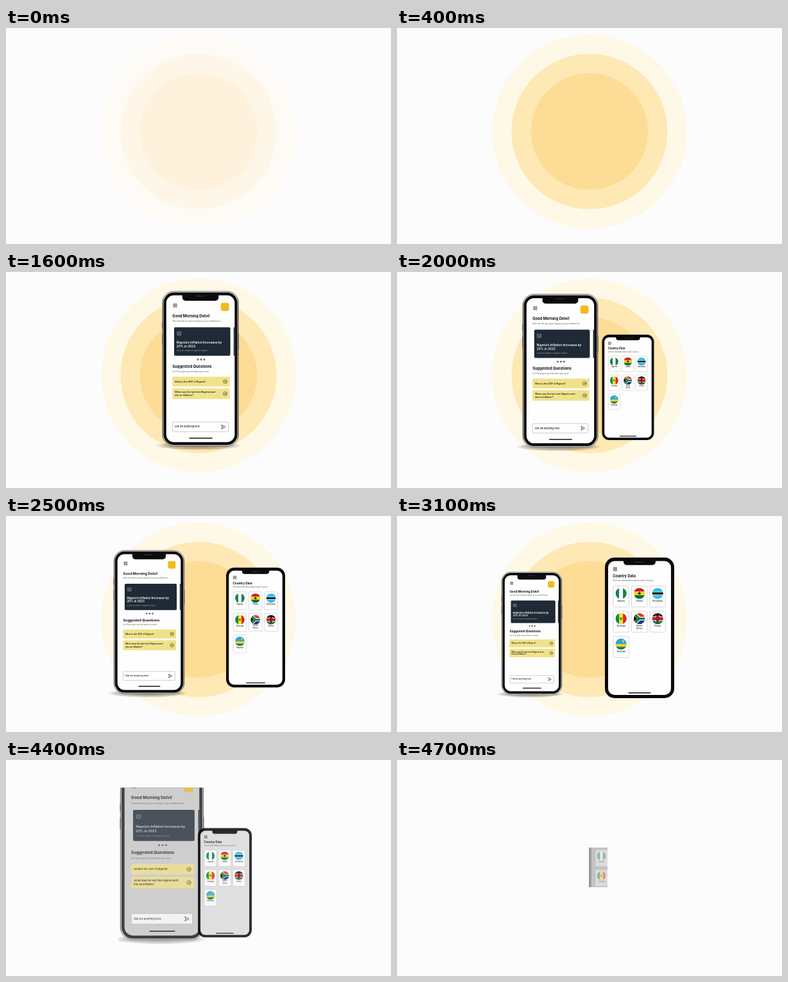
Recreate the animation shown at these times as an HTML page with a canvas. Size 600 by 338 pixels, loop 4.8 s.

```html
<!DOCTYPE html>
<html lang="en">
<head>
<meta charset="utf-8">
<title>Phones</title>
<style>
html, body { margin: 0; width: 100%; height: 100%; overflow: hidden; background: #fdfcfd; }
canvas { display: block; width: 600px; height: 338px; }
</style>
</head>
<body>
<canvas id="stage"></canvas>
<script>
const W = 600, H = 338, LOOP = 4800, STEP = 100;
const cv = document.getElementById('stage');
const c = cv.getContext('2d');
const dpr = window.devicePixelRatio || 1;
cv.width = W * dpr;
cv.height = H * dpr;

const clamp = (v, a = 0, b = 1) => Math.max(a, Math.min(b, v));
const ramp = (t, a, b) => clamp((t - a) / (b - a));
const easeOut = p => 1 - Math.pow(1 - p, 3);

// rows: time, centre x, centre y, width
const leftPath = [
  [1200, 305, 149.5, 120], [1700, 302, 152, 118.5], [2000, 254.5, 154.5, 117.5],
  [2300, 229, 161, 113], [2500, 223, 166, 110], [3100, 210, 183.5, 94],
  [3700, 238.5, 156, 122], [4000, 243, 149, 130]
];
const rightPath = [
  [1700, 312, 170, 70], [2000, 360, 180.5, 81], [2300, 384, 177, 90],
  [2500, 389, 174.5, 92], [2900, 400, 156, 120], [3100, 378, 175, 108],
  [3500, 346, 205, 86], [3700, 340.5, 207.5, 81], [4000, 341, 192, 84]
];

// Smooth curve through the rows that never overshoots them
function along(path, t) {
  const last = path.length - 1;
  if (t <= path[0][0]) return path[0].slice(1);
  if (t >= path[last][0]) return path[last].slice(1);
  let i = 0;
  while (path[i + 1][0] <= t) i++;
  const rise = (j, k) => (path[j + 1][k] - path[j][k]) / (path[j + 1][0] - path[j][0]);
  const slope = (j, k) => {
    if (j === 0 || j === last) return 0;
    const a = rise(j - 1, k), b = rise(j, k);
    return a * b <= 0 ? 0 : 2 * a * b / (a + b);
  };
  const d = path[i + 1][0] - path[i][0], p = (t - path[i][0]) / d, q = 1 - p;
  return [1, 2, 3].map(k =>
    q * q * (1 + 2 * p) * path[i][k] + p * p * (3 - 2 * p) * path[i + 1][k] +
    d * p * q * (q * slope(i, k) - p * slope(i + 1, k)));
}

function box(x, y, w, h, r, fill, stroke, lw = 0.5) {
  c.beginPath();
  c.roundRect(x, y, w, h, r);
  if (fill) { c.fillStyle = fill; c.fill(); }
  if (stroke) { c.strokeStyle = stroke; c.lineWidth = lw; c.stroke(); }
}

function disc(x, y, r, fill) {
  c.beginPath();
  c.arc(x, y, r, 0, 7);
  c.fillStyle = fill;
  c.fill();
}

function line(pts, color, lw) {
  c.beginPath();
  pts.forEach(([x, y]) => c.lineTo(x, y));
  c.strokeStyle = color;
  c.lineWidth = lw;
  c.stroke();
}

function poly(pts, fill) {
  c.beginPath();
  pts.forEach(([x, y]) => c.lineTo(x, y));
  c.closePath();
  c.fillStyle = fill;
  c.fill();
}

function text(s, x, y, size, weight = 400, color = '#111', align = 'left') {
  c.font = `${weight} ${size}px Inter, Roboto, sans-serif`;
  c.textAlign = align;
  c.fillStyle = color;
  c.fillText(s, x, y);
}

function menuIcon(x, y) {
  for (let i = 0; i < 4; i++)
    box(x + (i % 2) * 3.2, y + (i >> 1) * 3.2, 2.2, 2.2, 0.5, null, '#222', 0.7);
}

function notch(x, w, top, bottom) {
  box(x, top, w, bottom - top, [0, 0, 5, 5], '#0b0b0d');
  box(x + w / 2 - 8, top + 2, 13, 1.3, 0.6, '#34343a');
  disc(x + w / 2 + 9, top + 2.6, 1, '#242a3c');
}

function arrow(x, y) {
  c.beginPath();
  c.arc(x, y, 3, 0, 7);
  c.strokeStyle = '#222';
  c.lineWidth = 0.6;
  c.stroke();
  line([[x - 1.6, y], [x + 1.6, y]], '#222', 0.6);
  line([[x + 0.4, y - 1.3], [x + 1.7, y], [x + 0.4, y + 1.3]], '#222', 0.6);
}

function shadow() {
  c.save();
  c.translate(57, 244);
  c.scale(68, 7);
  const g = c.createRadialGradient(0, 0, 0.2, 0, 0, 1);
  g.addColorStop(0, 'rgba(60,50,30,.5)');
  g.addColorStop(0.75, 'rgba(60,50,30,.25)');
  g.addColorStop(1, 'rgba(60,50,30,0)');
  disc(0, 0, 1, g);
  c.restore();
}

// 120 x 245 units
function homePhone() {
  shadow();
  const metal = c.createLinearGradient(0, 0, 120, 0);
  metal.addColorStop(0, '#55565a');
  metal.addColorStop(0.02, '#d9dadd');
  metal.addColorStop(0.98, '#d9dadd');
  metal.addColorStop(1, '#55565a');
  box(-0.5, 48, 1.5, 11, 0.5, '#66676b');
  box(-0.5, 68, 1.5, 17, 0.5, '#66676b');
  box(119.2, 67, 1.3, 26, 0.5, '#66676b');
  box(0.3, 0.3, 119.4, 244.4, 17.5, metal, '#3c3d40', 0.7);
  box(2, 2, 116, 241, 16, '#0b0b0d');
  box(6.2, 6.5, 107.6, 232, 12, '#fefefe');
  notch(31.5, 57, 5, 15.2);

  menuIcon(17.4, 19.8);
  box(92, 18.3, 13, 13, 3, '#f0bb22');
  text('Good Morning Dolvi!', 15.8, 41.4, 5.9, 700);
  text('Here are the top topics based on your preferences', 15.8, 48.3, 3.2, 400, '#555');

  box(18.5, 57, 88.5, 45, 2, '#1e2a35');
  box(112.2, 57, 1.6, 45, 0.5, '#1e2a35');
  box(23.5, 64.3, 6, 5, 0.6, null, '#c5cbd0', 0.6);
  for (const y of [66, 67.8]) line([[24.6, y], [26, y]], '#c5cbd0', 0.7);
  for (const y of [66, 67.8]) line([[26.8, y], [28.5, y]], '#c5cbd0', 0.5);
  text('Nigeria\u2019s Inflation Increases by', 22.4, 83, 4.8, 600, '#fff');
  text('20% in 2023', 22.4, 89, 4.8, 600, '#fff');
  text('Get all the details on Nigeria\u2019s Inflation', 22.4, 95.4, 2.7, 400, '#a3abb2');
  for (let i = 0; i < 3; i++) disc(56 + i * 5, 108, 1.45, '#625f66');

  text('Suggested Questions', 15.8, 121, 5.9, 700);
  text('Let Tolvin give you the facts you need', 15.8, 128.2, 3.2, 400, '#555');
  box(15.8, 135, 90.4, 15.5, 1.5, '#f0e28a');
  box(15.8, 153.6, 90.4, 16.8, 1.5, '#f0e28a');
  text('What is the GDP of Nigeria?', 19.6, 144, 3.7, 500);
  text('When was the last time Nigeria went', 19.6, 160.8, 3.7, 500);
  text('into an Inflation?', 19.6, 165.6, 3.7, 500);
  arrow(98.8, 142.8);
  arrow(98.8, 162);

  box(16, 206.8, 88, 15.2, 1.2, '#fff', '#a4a4a8', 0.6);
  text('Ask me anything here', 19.6, 215.5, 3.8, 500);
  c.lineJoin = 'round';
  line([[93, 211.2], [99, 214.4], [93, 217.6], [94.2, 214.4], [93, 211.2]], '#222', 0.7);
  line([[94.2, 214.4], [96.5, 214.4]], '#222', 0.6);
  box(42, 231.4, 37, 1.6, 0.8, '#111');
}

function bands(colors, upright) {
  const n = colors.length, s = 2 / n;
  colors.forEach((col, i) => {
    c.fillStyle = col;
    if (upright) c.fillRect(-1 + i * s, -1, s + 0.01, 2);
    else c.fillRect(-1, -1 + i * s, 2, s + 0.01);
  });
}

function strip(y, h, color) {
  c.fillStyle = color;
  c.fillRect(-1, y, 2, h);
}

function star(x, y, r, color) {
  poly(Array.from({ length: 10 }, (_, i) => {
    const a = i * Math.PI / 5 - Math.PI / 2, d = i % 2 ? r * 0.4 : r;
    return [x + d * Math.cos(a), y + d * Math.sin(a)];
  }), color);
}

const flags = {
  Nigeria() { bands(['#16834f', '#fff', '#16834f'], true); },
  Ghana() { bands(['#cf1b2c', '#f9d31c', '#0a7040']); star(0, 0, 0.36, '#111'); },
  Botswana() { bands(['#35bfe8']); strip(-0.28, 0.56, '#fff'); strip(-0.19, 0.38, '#111'); },
  Senegal() { bands(['#0b8a43', '#fbe11f', '#de2530'], true); star(0, 0, 0.34, '#0b8a43'); },
  'South Africa'() {
    bands(['#de3b2f', '#1c2f8c']);
    const arm = (w, col) => {
      c.lineJoin = 'miter';
      line([[-1.1, -1.1], [0, 0], [-1.1, 1.1]], col, w);
      line([[-0.1, 0], [1.1, 0]], col, w);
    };
    arm(0.66, '#fff');
    poly([[-1, -0.85], [-0.15, 0], [-1, 0.85]], '#f7b51a');
    poly([[-1, -0.6], [-0.38, 0], [-1, 0.6]], '#111');
    arm(0.38, '#0c7c4e');
  },
  Kenya() {
    bands(['#151515', '#c22026', '#0b6a38']);
    strip(-0.4, 0.12, '#fff');
    strip(0.28, 0.12, '#fff');
    line([[-0.4, -0.65], [0.4, 0.65]], '#fff', 0.1);
    line([[0.4, -0.65], [-0.4, 0.65]], '#fff', 0.1);
    c.save();
    c.scale(0.5, 1);
    disc(0, 0, 0.58, '#a4141b');
    c.restore();
  },
  Rwanda() {
    bands(['#29a5df']);
    strip(0, 0.5, '#f8d420');
    strip(0.5, 0.5, '#2a8048');
    star(0.4, -0.5, 0.3, '#f8d420');
  }
};

function flagCard(name, i) {
  const x = 13 + (i % 3) * 28.5, y = 44.5 + Math.floor(i / 3) * 39.6, mid = x + 12.2;
  box(x, y, 24.4, 32.8, 1.8, '#fff', '#bdbdc2', 0.6);
  c.save();
  c.translate(mid, y + 11.6);
  c.scale(8.7, 8.7);
  c.beginPath();
  c.arc(0, 0, 1, 0, 7);
  c.clip();
  flags[name]();
  c.restore();
  const words = name.split(' ');
  words.forEach((w, k) =>
    text(w, mid, y + 24 + k * 4.4 - (words.length - 1) * 0.5, 3.4, 500, '#222', 'center'));
}

// 108 x 220 units
function dataPhone() {
  box(0, 0, 108, 220, 15, '#09090b');
  box(5, 5.5, 98, 209.5, 10, '#fefefe');
  notch(29, 50, 4.5, 11.8);
  menuIcon(13.2, 15.4);
  text('Country Data', 12.2, 30.6, 5.5, 700);
  text('Find out information about each Country.', 12.6, 37.2, 3.3, 400, '#555');
  Object.keys(flags).forEach(flagCard);
  box(36.5, 211, 35, 1.5, 0.7, '#111');
}

function place([x, y, w], uw, uh, draw, turn = 0) {
  c.save();
  c.translate(x, y);
  c.rotate(turn);
  c.scale(w / uw, w / uw);
  c.translate(-uw / 2, -uh / 2);
  draw();
  c.restore();
}

function rings(t) {
  const a = t < 3600 ? 0.32 + 0.68 * ramp(t, 0, 400) : 1 - ramp(t, 3500, 3900);
  if (a <= 0) return;
  c.globalAlpha = a;
  const set = [[152, '#fef8e6'], [121.5, '#fee8b4'], [91.5, '#fddc95']];
  // each ring masks the one beneath it, so fading stays even
  set.forEach(([r, col], i) => {
    c.globalAlpha = 1;
    if (i) disc(300, 162, r, '#fdfcfd');
    c.globalAlpha = a;
    disc(300, 162, r, col);
  });
  const gray = 1 - Math.abs(t - 3700) / 100;
  if (gray > 0) {
    c.globalAlpha = gray * 0.85;
    disc(272, 191, 110, '#cbc9c4');
  }
  c.globalAlpha = 1;
}

function frame(t) {
  c.setTransform(dpr, 0, 0, dpr, 0, 0);
  c.globalAlpha = 1;
  c.fillStyle = '#fdfcfd';
  c.fillRect(0, 0, W, H);
  rings(t);

  const out = ramp(t, 4300, 4700);
  c.save();
  if (out > 0) {
    const half = 31 + 125 * (1 - out);
    c.beginPath();
    c.rect(300 - half, 168 - half, half * 2 - 3, half * 2);
    c.clip();
  }
  const showLeft = () => {
    if (t < 600) return;
    const p = easeOut(ramp(t, 500, 1150));
    const [x, y, w] = along(leftPath, t);
    c.globalAlpha = clamp(p * 1.4) * (1 - out);
    place([x, y, w * p], 120, 245, homePhone, -1.1 * (1 - p));
  };
  const showRight = () => {
    if (t < 1800) return;
    c.globalAlpha = 1 - 0.6 * out;
    place(along(rightPath, t), 108, 220, dataPhone);
  };
  const order = [showLeft, showRight];
  if (t < 2500) order.reverse();
  order.forEach(show => show());
  c.restore();
}

const start = performance.now();
function tick() {
  const t = (performance.now() - start) % LOOP;
  frame(Math.floor(t / STEP) * STEP);
  requestAnimationFrame(tick);
}
tick();
</script>
</body>
</html>
```
